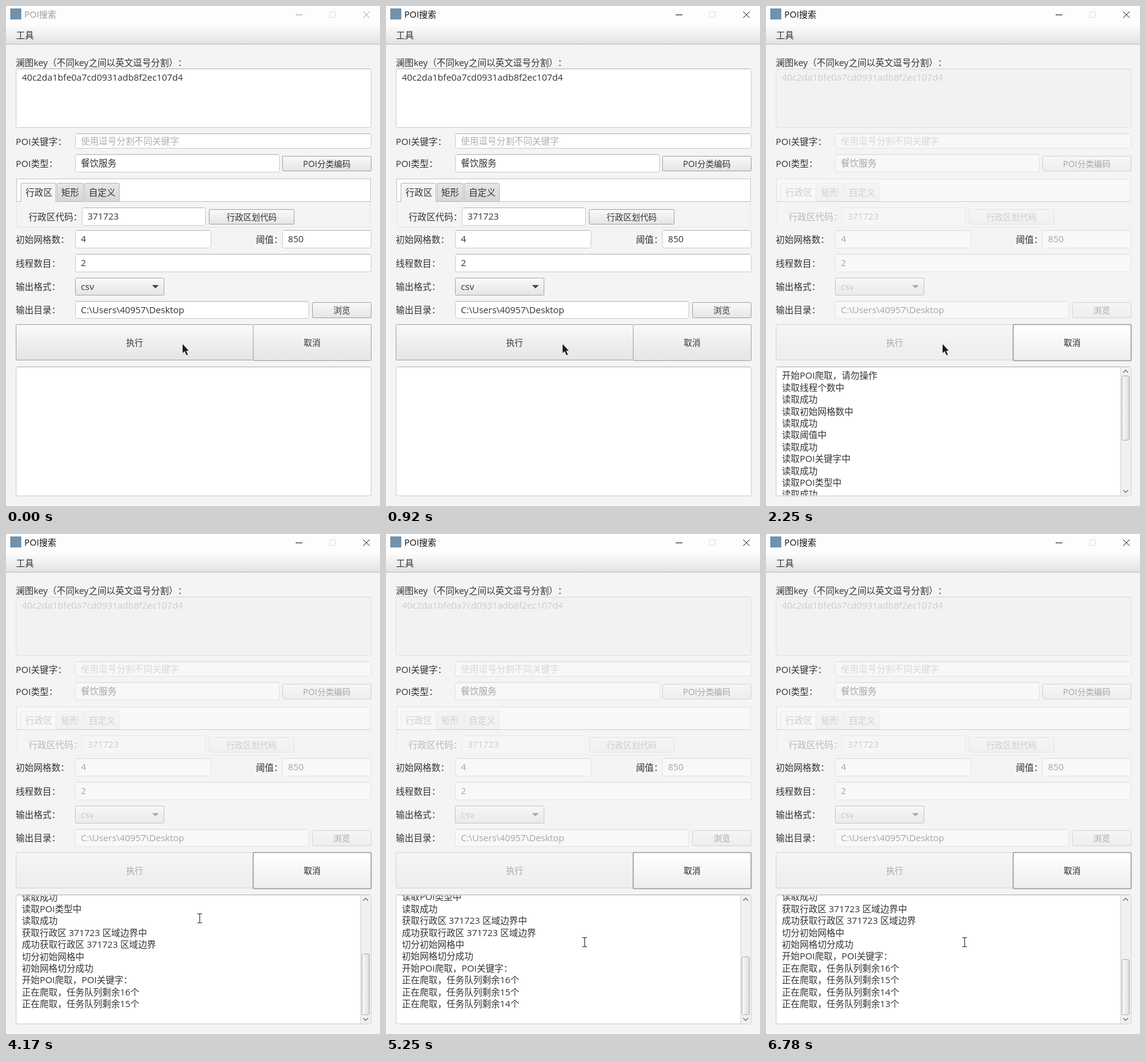
These frames come from a looping animation (612x817 px, 8000 ms). An HTML page:

```html
<!DOCTYPE html>
<html lang="zh-CN">
<head>
<meta charset="utf-8">
<title>POI搜索</title>
<style>
html, body { margin: 0; width: 100%; height: 100%; overflow: hidden; background: #f4f4f4; }
svg { display: block; width: 612px; height: 817px; }
text { font: 14.6px "Noto Sans CJK SC", "Noto Sans CJK", sans-serif; fill: #333; white-space: pre; text-spacing-trim: space-all; }
text.btn { font-size: 13.7px; text-anchor: middle; }
text.title { font-size: 14.2px; fill: #999; }
text.hint { fill: #aeaeae; }
.latin { font-family: "Open Sans", "Noto Sans", sans-serif; font-size: 1.02em; }
.caption { stroke: #999; fill: none; }
.active .caption { stroke: #111; }
.active text.title { fill: #111; }
.busy .dim { opacity: .4; }
.busy .soft { opacity: .6; }
.busy .pale { opacity: .3; }
.busy .faint { opacity: .2; }
.busy #keys rect { fill: #f2f2f2; stroke: #e0e0e0; }
.busy #keys path { stroke: #e4e4e4; }
.busy #cancel rect { fill: url(#lit); stroke: #999; stroke-width: 1.6; }
.busy #cancel text { fill: #222; font-weight: 500; }
</style>
</head>
<body>
<svg id="stage" viewBox="0 0 612 817">
  <defs>
    <linearGradient id="bar" x2="0" y2="1"><stop stop-color="#fcfcfc"/><stop offset="1" stop-color="#e2e2e2"/></linearGradient>
    <linearGradient id="face" x2="0" y2="1"><stop stop-color="#fafafa"/><stop offset=".5" stop-color="#efefef"/><stop offset="1" stop-color="#e5e5e5"/></linearGradient>
    <linearGradient id="lit" x2="0" y2="1"><stop stop-color="#fff"/><stop offset="1" stop-color="#eee"/></linearGradient>
    <linearGradient id="tab" x2="0" y2="1"><stop stop-color="#e6e6e6"/><stop offset="1" stop-color="#d6d6d6"/></linearGradient>
    <linearGradient id="thumbFill"><stop stop-color="#fafafa"/><stop offset="1" stop-color="#dedede"/></linearGradient>
    <clipPath id="view"><rect x="17" y="590.5" width="563" height="209"/></clipPath>
  </defs>
</svg>
<script>
const LOOP = 8000, LINE = 19.4, VIEW = 202.6, TRACK_TOP = 604.5, TRACK = 181;
const stage = document.getElementById('stage');

const latin = s => s.replace(/[\x20-\x7e]+/g, m => `<tspan class="latin">${m}</tspan>`);
const text = (x, mid, s, cls = '') => `<text x="${x}" y="${mid + 5.3}" class="${cls}">${latin(s)}</text>`;
const rect = (x, y, r, b, fill, stroke, rx = 0) =>
  `<rect x="${x + .5}" y="${y + .5}" width="${r - x - 1}" height="${b - y - 1}" rx="${rx}" fill="${fill}" stroke="${stroke}"/>`;
const line = (d, stroke, extra = '') => `<path d="${d}" stroke="${stroke}" fill="none" ${extra}/>`;
const group = (cls, ...parts) => `<g class="${cls}">${parts.join('')}</g>`;

// Sunken white box with a soft shadow under its top edge.
const box = (x, y, r, b) => rect(x, y, r, b, '#fff', '#cbcbcb', 3) +
  line(`M${x + 3} ${y + .5}H${r - 3}`, '#bdbdbd') + line(`M${x + 2} ${y + 1.5}H${r - 2}`, '#ececec');
const field = (x, y, r, b, s, dim = 'dim', cls = '') =>
  group(dim, box(x, y, r, b), text(x + 9.5, (y + b) / 2, s, cls));
const button = (x, y, r, b, s, dim = 'dim') =>
  group(dim, rect(x, y, r, b, 'url(#face)', '#a2a2a2', 1), text((x + r) / 2, (y + b) / 2, s, 'btn'));

const done = '读取成功', area = '行政区 371723 区域边界';
const log = ['开始POI爬取，请勿操作'];
for (const s of ['线程个数', '初始网格数', '阈值', 'POI关键字', 'POI类型']) log.push(`读取${s}中`, done);
log.push(`获取${area}中`, `成功获取${area}`, '切分初始网格中', '初始网格切分成功', '开始POI爬取，POI关键字：');
for (let n = 16; n > 12; n--) log.push(`正在爬取，任务队列剩余${n}个`);

const titleBar = '<path d="M0 0H612V32H0z" fill="#fdfdfd"/><path d="M0 32H612V62H0z" fill="url(#bar)"/>' +
  line('M0 62.5H612', '#bcbcbc') +
  '<rect x="7" y="4" width="18" height="18" fill="#7192ad"/>' +
  text(30, 14, 'POI搜索', 'title') +
  '<path class="caption" d="M474 14.5H485M584.5 9L595 19.5M595 9L584.5 19.5"/>' +
  line('M529.5 9.5H538.5V18.5H529.5z', '#dedede') +
  text(16.5, 47.5, '工具');

const tabs = group('dim', rect(17, 282, 597, 320, '#fff', '#c6c6c6'), rect(17, 319, 597, 362, '#f4f4f4', '#e5e5e5')) +
  group('soft', line('M17 319.5H597', '#bfbfbf')) +
  group('faint',
    '<path d="M24.5 320V291Q24.5 289.5 26 289.5H80Q81.5 289.5 81.5 291V320" fill="#f4f4f4" stroke="#b8b8b8"/>',
    rect(83, 289, 127, 320, 'url(#tab)', '#b8b8b8', 1),
    rect(128, 289, 186, 320, 'url(#tab)', '#b8b8b8', 1),
    text(32, 305, '行政区'), text(90.5, 305, '矩形'), text(135.5, 305, '自定义')) +
  group('pale', text(37, 344.5, '行政区代码：')) +
  field(124, 329, 327, 359, '371723', 'faint') +
  button(332, 332, 472, 357, '行政区划代码', 'faint');

const form = text(16, 92.5, '澜图key（不同key之间以英文逗号分割）：') +
  '<g id="keys">' + box(16, 102, 598, 199) + '</g>' +
  group('faint', text(26, 117, '40c2da1bfe0a7cd0931adb8f2ec107d4')) +
  text(16, 221.5, 'POI关键字：') + field(113, 208, 598, 233, '使用逗号分割不同关键字', 'dim', 'hint') +
  text(16, 257.5, 'POI类型：') + field(113, 242, 448, 272, '餐饮服务') +
  button(452, 245, 598, 270, 'POI分类编码') +
  tabs +
  text(16, 381.5, '初始网格数：') + field(113, 366, 336, 396, '4') +
  text(409, 381.5, '阈值：') + field(452, 366, 598, 396, '850') +
  text(16, 420.5, '线程数目：') + field(113, 405, 598, 435, '2') +
  text(16, 459, '输出格式：') +
  group('soft', rect(113, 444, 259, 473, 'url(#face)', '#a9a9a9', 1)) +
  group('faint', text(122.5, 458.5, 'csv')) +
  group('dim', '<path d="M239 456H250L244.5 461.5z" fill="#444"/>') +
  text(16, 497, '输出目录：') + field(113, 482, 496, 511, 'C:\\Users\\40957\\Desktop') +
  button(501, 484, 598, 510, '浏览') +
  button(16, 520, 405, 579, '执行') +
  '<g id="cancel">' + button(404, 520, 598, 580, '取消', '') + '</g>';

const output = box(16, 589, 598, 801) +
  '<g id="report"><g clip-path="url(#view)"><g id="rows">' +
  log.map((s, i) => text(26, 604 + i * LINE, s)).join('') + '</g></g>' +
  '<path d="M580 590.5H597V799.5H580z" fill="#f0f0f0"/>' + line('M580.5 590V800M597.5 592V798', '#d2d2d2') +
  '<rect id="thumb" x="582.5" width="12" rx="2" fill="url(#thumbFill)" stroke="#ababab"/>' +
  line('M584.5 599L588.5 595L592.5 599M584.5 791L588.5 795L592.5 791', '#666', 'stroke-width="1.2"') + '</g>';

const pointers =
  '<path id="arrow" d="M289 552.5V567L292.3 564L295.3 570.5L297.6 569.4L294.7 563.2H299z" fill="#1c1c1c"/>' +
  '<path id="beam" d="M-4 -7.5H-1L0 -6.5L1 -7.5H4M0 -6.5V6.5M-4 7.5H-1L0 6.5L1 7.5H4" fill="none" stroke="#333" stroke-width="1.2"/>';

stage.insertAdjacentHTML('beforeend', titleBar + form + output + pointers);

const [report, rows, thumb, arrow, beam] =
  ['report', 'rows', 'thumb', 'arrow', 'beam'].map(id => document.getElementById(id));
const show = (el, on) => el.setAttribute('visibility', on ? 'visible' : 'hidden');

const lineTimes = [4170, 5250, 6690];
const beamPath = [[4170, 317, 628], [4250, 322, 650], [4320, 325, 663], [4470, 325, 665], [4550, 325, 667]];

function draw(t) {
  const busy = t >= 2090, follow = t >= 4170;
  stage.classList.toggle('active', t >= 770);
  stage.classList.toggle('busy', busy);
  show(report, busy);
  show(arrow, !follow);
  show(beam, follow);

  const count = 17 + lineTimes.filter(at => t >= at).length;
  const height = (count + 1) * LINE;
  const scroll = follow ? height - VIEW : 0;
  rows.setAttribute('transform', `translate(0 ${-scroll})`);
  [...rows.children].forEach((row, i) => row.setAttribute('display', i < count ? 'inline' : 'none'));
  thumb.setAttribute('y', TRACK_TOP + TRACK * scroll / height);
  thumb.setAttribute('height', TRACK * VIEW / height);

  if (follow) {
    const [, x, y] = beamPath.filter(p => t >= p[0]).pop();
    beam.setAttribute('transform', `translate(${x} ${y})`);
  }
}

function tick() {
  draw(performance.now() % LOOP);
  requestAnimationFrame(tick);
}
tick();
</script>
</body>
</html>
```
